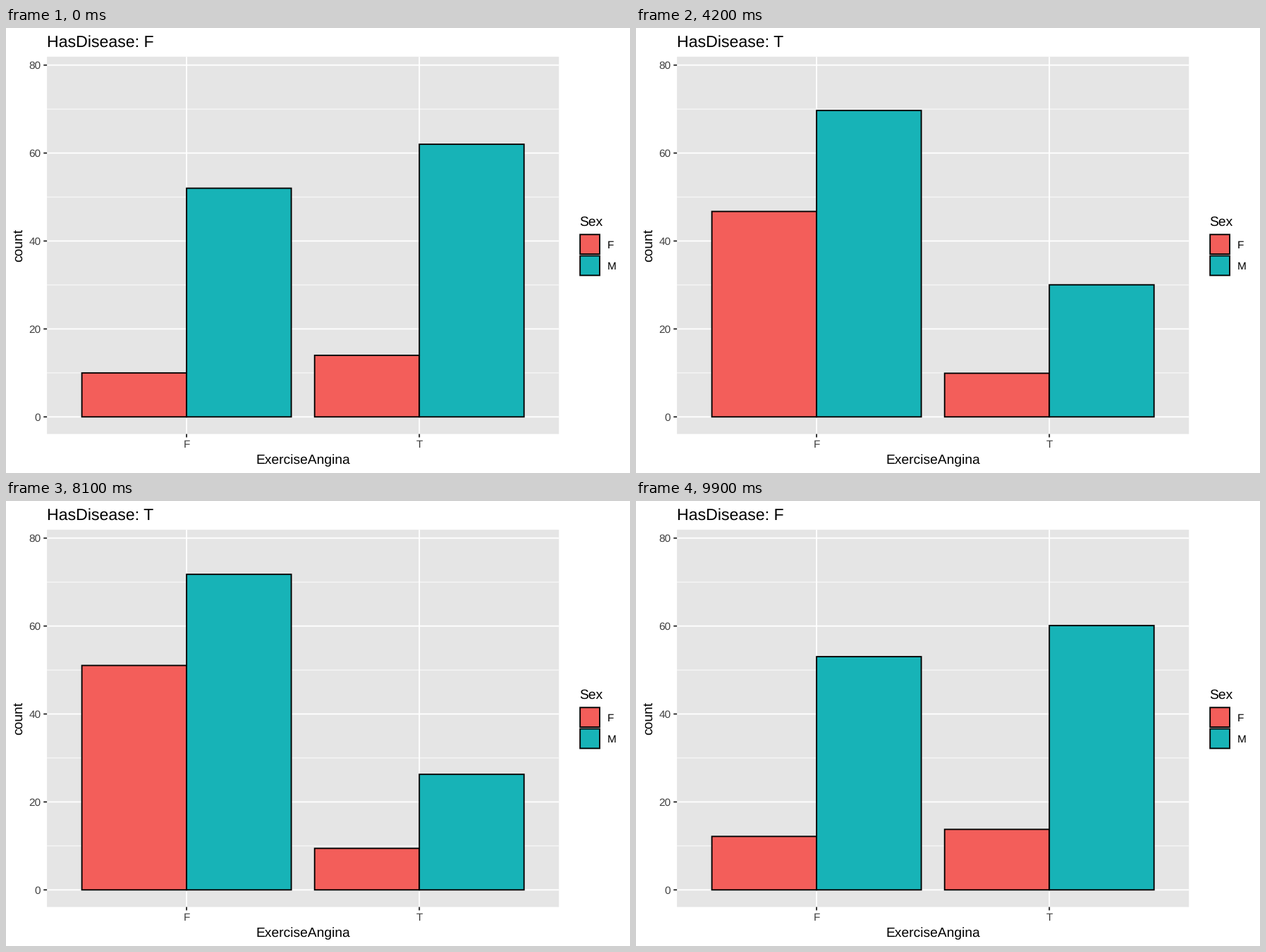
Recreate the animation shown at these times as a matplotlib script. Size 885x632 px, loop 10 s.

```python
import matplotlib.pyplot as plt
from matplotlib.animation import FuncAnimation
from matplotlib.patches import Rectangle

W, H, DPI = 885, 632, 100
FRAMES, STEP_MS = 100, 100
HOLD, MOVE = 25, 25            # frames at rest, frames in transition
PT = 1.75                      # pixels per layout point
THICK, THIN = 1.87, 0.93       # line widths in pixels

LEFT, RIGHT, TOP, BOTTOM = 58.1, 784.2, 40.8, 576.6
ZERO, UNIT = 552.3, 6.245      # y of count 0, pixels per count
CENTERS = (256.1, 586.2)
BAR_W = 148.5

CORAL, TEAL = "#F35E5A", "#17B3B7"
PANEL, TICK, LABEL = "#E5E5E5", "#272727", "#404040"

# (F/F, F/M, T/F, T/M) counts for each state
COUNTS = {"F": (10, 52, 14, 62), "T": (64, 78, 8, 15)}

plt.rcParams.update({
    "font.family": "Liberation Sans",
    "text.hinting": "none",
    "toolbar": "None",
})

fig = plt.figure(figsize=(W / DPI, H / DPI), dpi=DPI, facecolor="white")
ax = fig.add_axes([0, 0, 1, 1])
ax.set(xlim=(0, W), ylim=(H, 0))
ax.axis("off")


def px(n):
    return n * 72 / DPI


def y_of(count):
    return ZERO - count * UNIT


def line(xs, ys, color, width, z):
    ax.plot(xs, ys, color=color, lw=px(width), solid_capstyle="butt",
            snap=False, zorder=z)


def rect(x, y, w, h, fill, z, edge=True):
    patch = Rectangle((x, y), w, h, facecolor=fill,
                      edgecolor="black" if edge else "none",
                      lw=px(THICK) if edge else 0,
                      joinstyle="miter", snap=False, zorder=z)
    return ax.add_patch(patch)


def text(x, y, s, points, color="black", ha="left", **kw):
    return ax.text(x, y, s, fontsize=px(points * PT), color=color, ha=ha,
                   va="baseline", zorder=6, **kw)


def draw_panel():
    rect(LEFT, TOP, RIGHT - LEFT, BOTTOM - TOP, PANEL, 1, edge=False)
    for count in range(10, 80, 20):
        line((LEFT, RIGHT), (y_of(count),) * 2, "white", THIN, 2)
    for count in range(0, 81, 20):
        y = y_of(count)
        line((LEFT, RIGHT), (y, y), "white", THICK, 2)
        line((LEFT - 4.8, LEFT), (y, y), TICK, THICK, 2)
        text(49.4, y + 5.5, str(count), 8.8, LABEL, "right")
    for x, name in zip(CENTERS, "FT"):
        line((x, x), (TOP, BOTTOM), "white", THICK, 2)
        line((x, x), (BOTTOM, BOTTOM + 4.8), TICK, THICK, 2)
        text(x, 596.5, name, 8.8, LABEL, "center")
    text((LEFT + RIGHT) / 2, 618.6, "ExerciseAngina", 11, ha="center")
    ax.text(23.5, (TOP + BOTTOM) / 2, "count", fontsize=px(11 * PT),
            rotation=90, rotation_mode="anchor", ha="center", va="baseline")


def draw_legend():
    text(813, 281, "Sex", 11)
    for i, (name, fill) in enumerate((("F", CORAL), ("M", TEAL))):
        mid = 307.2 + 30.24 * i
        rect(813, mid - 15.12, 30.24, 30.24, "#EFEFEF", 3, edge=False)
        rect(814.2, mid - 13.9, 27.8, 27.8, fill, 4)
        text(852.9, mid + 5.9, name, 8.8)


draw_panel()
draw_legend()
title = text(LEFT, 26.5, "", 13.2)
bars = []
for center in CENTERS:
    bars.append(rect(center - BAR_W, ZERO, BAR_W, 0, CORAL, 4))
    bars.append(rect(center, ZERO, BAR_W, 0, TEAL, 4))


def update(frame):
    half, k = divmod(frame % FRAMES, HOLD + MOVE)
    start, end = ("F", "T") if half == 0 else ("T", "F")
    t = max(0, k - HOLD) / MOVE
    title.set_text("HasDisease: " + (end if t > 0.5 else start))
    for bar, a, b in zip(bars, COUNTS[start], COUNTS[end]):
        bar.set_height(-UNIT * (a + (b - a) * t))
    return [title, *bars]


anim = FuncAnimation(fig, update, frames=FRAMES, interval=STEP_MS,
                     init_func=lambda: update(0), repeat=True, repeat_delay=0)
plt.show()
```
